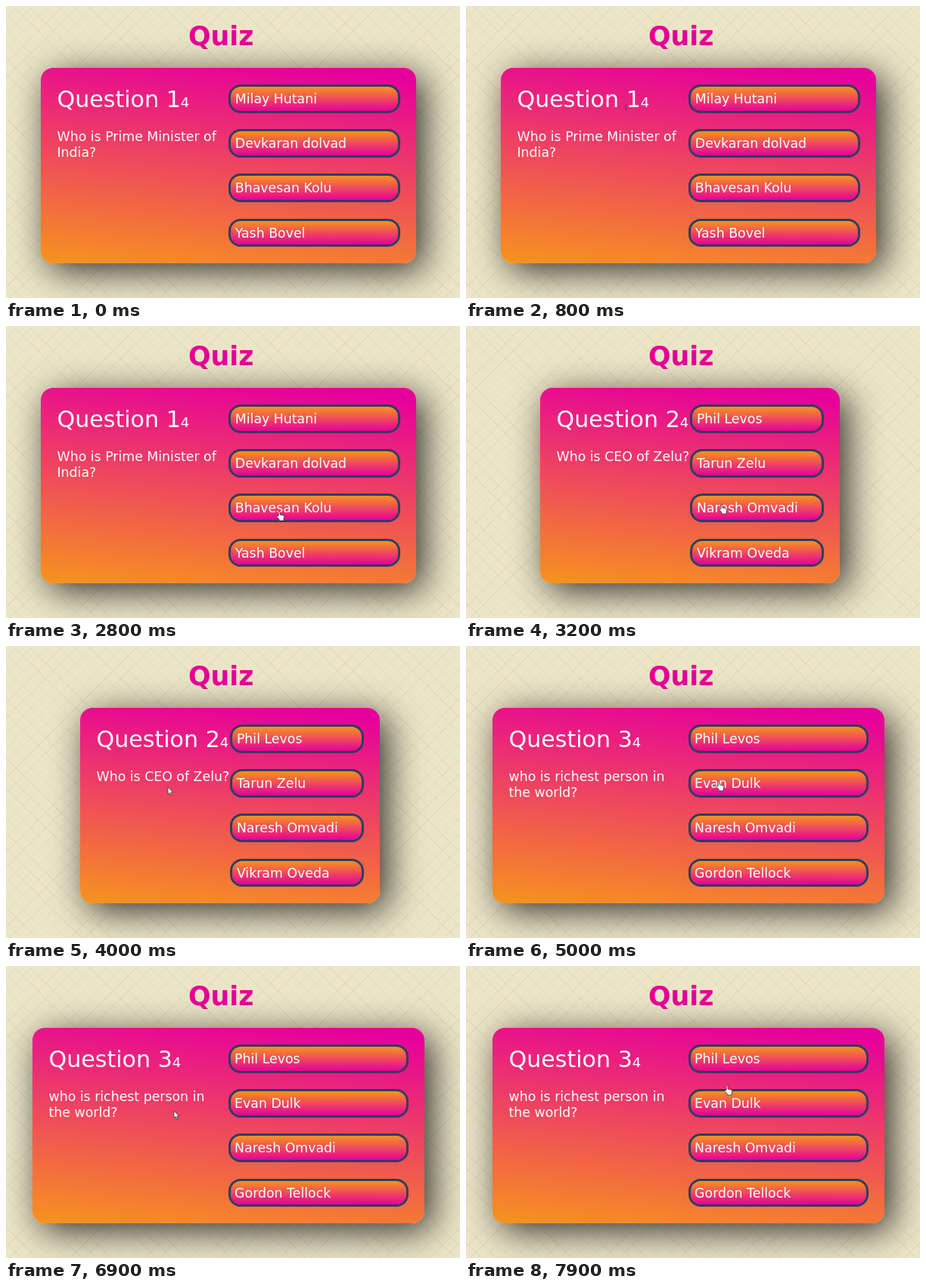
Write an HTML page that moves like this. It is 600 px wide and 387 px high and loops after 8000 ms.

```html
<!DOCTYPE html>
<html lang="en">
<head>
<meta charset="utf-8">
<title>Quiz</title>
<style>
  html, body { margin: 0; width: 100%; height: 100%; overflow: hidden; }
  body {
    position: relative;
    color: #fff;
    font: 17.35px/20.5px "DejaVu Sans", sans-serif;
    background:
      repeating-linear-gradient(45deg, rgba(120, 105, 70, .07) 0 1px, transparent 1px 14px),
      repeating-linear-gradient(-45deg, rgba(120, 105, 70, .07) 0 1px, transparent 1px 14px),
      #ede5c8;
  }
  body * { position: absolute; box-sizing: border-box; margin: 0; white-space: pre; }
  h1 { left: 241px; top: 19.5px; font-size: 34.8px; line-height: 40px; color: #e6009a; }
  #card {
    top: 82px; height: 259px; border-radius: 16px;
    background: linear-gradient(186deg, #e6009a 5%, #f7931e);
    box-shadow: 10px 10px 48px rgba(0, 0, 0, .8);
  }
  h2 { left: 21.5px; top: 23.6px; font-weight: 400; font-size: 30.1px; line-height: 36px; }
  h2 small { position: static; font-size: 18px; line-height: 1; }
  #ask { left: 21.5px; top: 81px; }
  .option {
    right: 21px; height: 37.5px; padding-left: 5.6px; line-height: 33px;
    border: 3px solid #2c3e63; border-radius: 16px;
    background: linear-gradient(#f7931e, #e6009a) padding-box;
  }
  svg { left: 0; top: 0; width: 12px; height: 16px; overflow: visible; }
  path { fill: #fff; stroke: #33303a; stroke-width: .8; stroke-linejoin: round; }
</style>
</head>
<body>
<h1>Quiz</h1>
<div id="card">
  <h2></h2>
  <p id="ask"></p>
  <div class="option"></div><div class="option"></div><div class="option"></div><div class="option"></div>
</div>
<svg id="cursor"><path/></svg>
<script>
const LOOP = 8000, STEP = 100;
const ARROW = 'M0 0V9.5L2.2 7.5L3.8 11L5.3 10.3L3.8 7H6.6Z';
const HAND = 'M-1 1Q0-1 1 1V5L5.5 6Q7 6.4 6.8 8L6 11V13H0V11.3L-3.2 7.5Q-3.2 6-1.6 6.6L-1 7.2Z';
const BEAM = 'M0-4V4';

const cards = [
  { from: 0, left: 46, right: 542, optionLeft: 294.2, ask: 'Who is Prime Minister of\nIndia?',
    options: ['Milay Hutani', 'Devkaran dolvad', 'Bhavesan Kolu', 'Yash Bovel'] },
  { from: 3000, left: 98, right: 494, optionLeft: 296.3, ask: 'Who is CEO of Zelu?',
    options: ['Phil Levos', 'Tarun Zelu', 'Naresh Omvadi', 'Vikram Oveda'] },
  { from: 4900, left: 35, right: 552.5, optionLeft: 293.5, ask: 'who is richest person in\nthe world?',
    options: ['Phil Levos', 'Evan Dulk', 'Naresh Omvadi', 'Gordon Tellock'] }
];

// Pointer stops: time, x, y
const stops = [
  [0, 197, 128], [600, 197, 128], [1600, 334.5, 184], [2000, 334.5, 184],
  [2700, 361, 245], [3000, 361, 245], [3800, 214, 187], [4000, 214, 187],
  [4600, 340, 180], [4900, 340, 180], [5500, 261, 165], [6200, 240, 180],
  [6900, 222, 192], [7200, 222, 192], [7900, 345, 158]
];

const $ = s => document.querySelector(s);
const card = $('#card'), cursor = $('#cursor'), shape = $('path');
const options = [...document.querySelectorAll('.option')];
const optionTop = i => 104 + 59.2 * i;
options.forEach((o, i) => o.style.top = optionTop(i) - 82 + 'px');

let shown = -1;
function showCard(n) {
  if (n === shown) return;
  shown = n;
  const c = cards[n];
  card.style.left = c.left + 'px';
  card.style.width = c.right - c.left + 'px';
  $('h2').innerHTML = `Question ${n + 1}<small>4</small>`;
  $('#ask').textContent = c.ask;
  options.forEach((o, i) => {
    o.textContent = c.options[i];
    o.style.left = c.optionLeft - c.left + 'px';
  });
}

function pointerAt(t) {
  const i = stops.findIndex(s => s[0] > t);
  if (i < 0) return stops.at(-1).slice(1);
  const [t0, x0, y0] = stops[i - 1], [t1, x1, y1] = stops[i];
  const p = (t - t0) / (t1 - t0), e = p * p * (3 - 2 * p);
  return [x0 + (x1 - x0) * e, y0 + (y1 - y0) * e];
}

function pointerShape(x, y, c) {
  const overOption = x > c.optionLeft && x < c.right - 21 &&
    options.some((_, i) => y > optionTop(i) - 6 && y < optionTop(i) + 38);
  const overTitle = x > c.left + 21 && x < c.left + 196 && y > 108 && y < 140;
  return overOption ? HAND : overTitle ? BEAM : ARROW;
}

function draw(now) {
  const t = Math.floor(now % LOOP / STEP) * STEP;
  const n = cards.findLastIndex(c => t >= c.from);
  showCard(n);
  const [x, y] = pointerAt(t);
  shape.setAttribute('d', pointerShape(x, y, cards[n]));
  cursor.style.transform = `translate(${x}px, ${y}px)`;
  requestAnimationFrame(draw);
}
draw(0);
</script>
</body>
</html>
```
